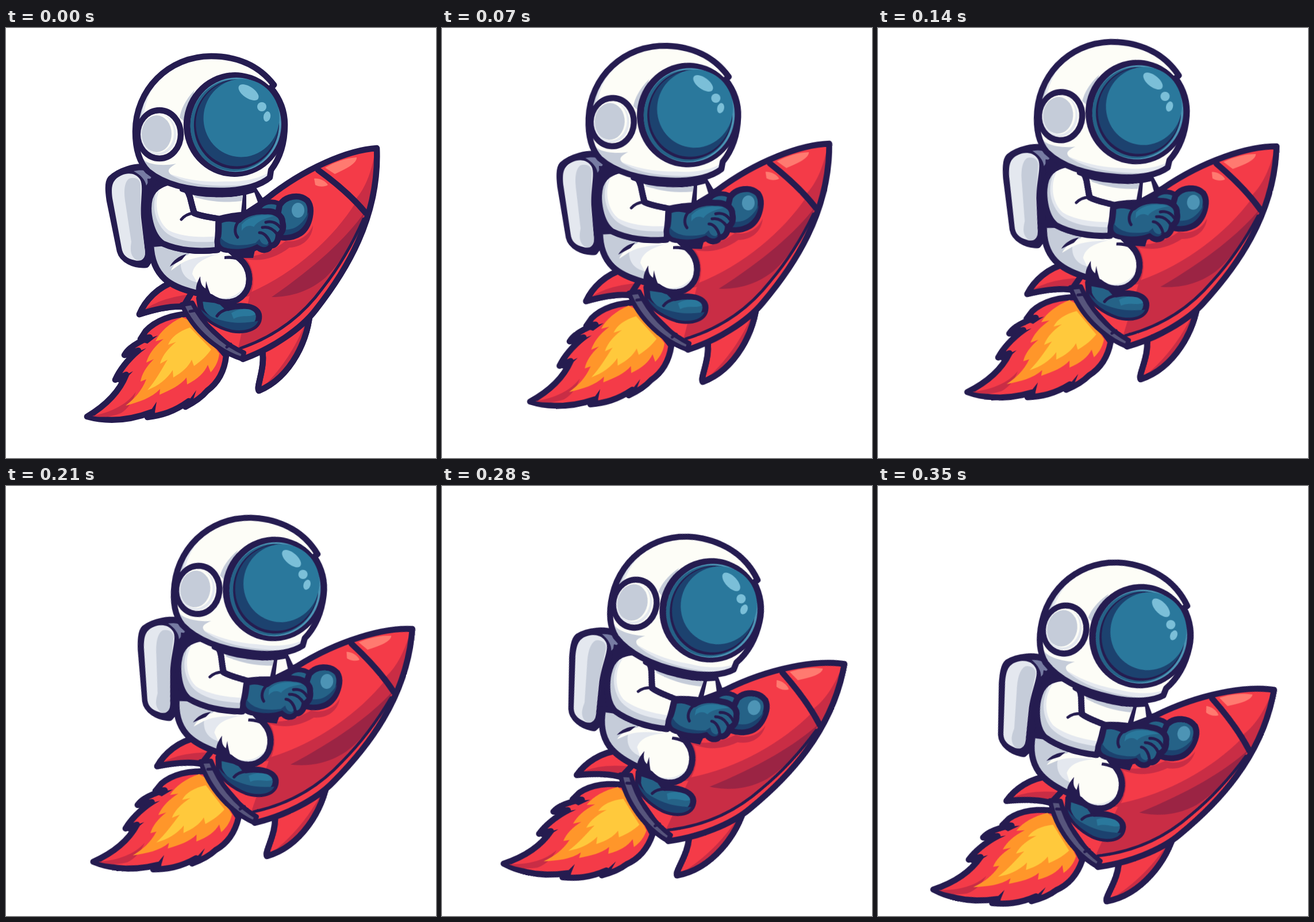
These frames come from a looping animation (748 px wide and 748 px high, 420 ms). An HTML page:

```html
<!DOCTYPE html>
<html lang="en">
<head>
<meta charset="utf-8">
<title>Astronaut riding a rocket</title>
<style>
  html, body { margin: 0; width: 100%; height: 100%; overflow: hidden; background: #fff; }
  svg { display: block; width: 100vw; height: 100vh; }

  #rider {
    transform-origin: 391.5px 441px;
    animation: fly 420ms step-end infinite;
  }
  @keyframes fly {
    0%      { transform: none; }
    16.667% { transform: translate(20.5px, -17px) rotate(2.05deg); }
    33.333% { transform: translate(31.5px, -23px) rotate(4.35deg); }
    50%     { transform: translate(36.5px, 8.5px) rotate(6.7deg); }
    66.667% { transform: translate(11px, 40.5px) rotate(12.45deg); }
    83.333% { transform: translate(0, 85.5px) rotate(12.45deg); }
  }

  .ink { stroke: #251c50; stroke-width: 10.5; stroke-linejoin: round; stroke-linecap: round; }
  .mid { stroke-width: 8; }
  .thin { stroke-width: 5; }
  .line { fill: none; }
  .navy { fill: #251c50; }
  .white { fill: #fdfdf7; }
  .pale { fill: #e4e8ef; }
  .grey { fill: #c5ccd9; }
  .slate { fill: #777ca3; }
  .steel { fill: #57557c; }
  .red { fill: #f43b48; }
  .crimson { fill: #c92d45; }
  .maroon { fill: #9b2444; }
  .pink { fill: #ff7a70; }
  .orange { fill: #ff962a; }
  .yellow { fill: #ffc93c; }
  .blue { fill: #2a789c; }
  .teal { fill: #256287; }
  .deep { fill: #1c426f; }
  .sky { fill: #4d94b5; }
  .glint { fill: #7bbfd8; }
</style>
</head>
<body>
<svg viewBox="0 0 748 748" role="img" aria-label="Astronaut riding a rocket">
  <defs>
    <path id="hull" d="M645 209C597 212 520 243 452 298L400 330L310 482L412 576C462 558 513 524 539 490C590 425 650 330 645 209Z"/>
    <path id="flame" d="M322 497C288 498 260 509 243 527L234 541L250 538C230 546 213 556 206 569L230 561C212 577 198 594 190 612L209 603C196 636 168 660 141 676C174 685 212 684 254 668L246 677C270 674 292 668 318 649L312 659C328 651 340 643 350 631C369 617 380 598 383 570Z"/>
    <path id="helmet" d="M466 99C439 64 400 49 357 49C282 49 225 108 225 180C225 210 232 234 247 249C281 277 330 284 380 283C415 282 444 273 459 260L461 247C477 226 485 200 485 168C485 143 476 122 461 104Z"/>
    <path id="thigh" d="M252 376L300 372L380 378L407 402C427 419 427 448 414 463C400 480 374 481 356 468L328 460C290 451 254 435 252 376Z"/>
    <path id="arm" d="M268 274C292 260 314 273 320 294L327 322C340 328 356 329 370 332L368 386C335 390 300 387 273 375C252 361 244 320 250 296C254 284 260 278 268 274Z"/>
    <path id="boot" d="M336 470L372 474L386 487C410 480 439 484 440 501C441 520 420 529 394 525C368 519 345 504 339 489Z"/>
    <path id="pack" d="M250 244C226 236 194 250 182 262C176 269 178 286 180 300L198 388C202 403 222 414 244 412L262 385L258 270Z"/>
    <path id="finR" d="M529 488C528 538 497 607 440 631C434 625 453 589 445 556C478 544 508 520 529 488Z"/>
    <path id="finL" d="M232 498C242 474 264 450 296 440L334 466L314 485C286 482 256 490 232 498Z"/>
    <clipPath id="inHull"><use href="#hull"/></clipPath>
    <clipPath id="inHelmet"><use href="#helmet"/></clipPath>
    <clipPath id="inThigh"><use href="#thigh"/></clipPath>
    <clipPath id="inArm"><use href="#arm"/></clipPath>
    <clipPath id="inBoot"><use href="#boot"/></clipPath>
    <clipPath id="inFinR"><use href="#finR"/></clipPath>
    <clipPath id="inFinL"><use href="#finL"/></clipPath>
  </defs>

  <g id="rider">
    <g id="fire">
      <use href="#flame" class="red ink"/>
      <path class="crimson" d="M150 675C185 668 211 654 226 633C221 649 213 662 200 670C182 677 166 678 150 675Z"/>
      <path class="navy" d="M233 545L264 535L246 549ZM205 573L244 557L221 575ZM188 614L221 597L201 618ZM243 679L262 650L258 674ZM308 662L331 630L323 655Z"/>
      <path class="orange" d="M306 503C284 514 268 528 260 545L274 541C258 554 248 568 244 582L257 576C244 589 236 602 234 615L244 611C236 632 223 645 208 657C232 650 253 644 268 628L267 638C287 629 303 622 314 608L315 620C334 610 345 600 351 586L356 599C366 588 370 577 371 566L330 514Z"/>
      <path class="yellow" d="M320 521C300 528 287 538 282 551L296 546C280 559 271 572 268 584L281 577C270 595 260 614 246 630C265 622 280 611 290 595L291 608C306 599 317 590 323 577L327 588C340 579 350 569 357 559Z"/>
    </g>

    <g id="rocket">
      <use href="#finL" class="red ink"/>
      <path class="crimson" clip-path="url(#inFinL)" d="M232 498C252 478 285 466 334 462L320 490Z"/>
      <use href="#finL" class="line ink"/>

      <use href="#finR" class="red ink"/>
      <path class="crimson" clip-path="url(#inFinR)" d="M532 480C518 532 486 590 440 631L470 628C510 602 535 540 532 480ZM444 556L490 535C478 552 462 561 448 566Z"/>
      <use href="#finR" class="line ink"/>

      <use href="#hull" class="red"/>
      <g clip-path="url(#inHull)">
        <path class="crimson" d="M608 304C570 364 506 424 425 460L400 575L470 570L660 330L660 190L643 208C638 244 626 280 606 300Z"/>
        <path class="maroon" d="M624 320C592 366 536 417 462 468C496 468 528 458 556 434C586 404 608 366 624 320Z"/>
        <path class="crimson" d="M405 395C432 402 462 390 487 370C504 374 526 364 534 343C533 366 516 381 493 382C470 400 444 407 418 402C432 418 434 447 424 466L408 470Z"/>
        <path class="red" d="M408 560C470 538 516 502 551 454C577 421 600 384 622 334L660 330L560 500L412 590Z"/>
        <path class="line ink thin" d="M408 557C470 536 516 500 551 452C577 419 600 382 622 332"/>
      </g>
      <path class="pink" d="M555 243C572 233 592 226 610 225C611 235 592 245 572 254ZM536 262C545 261 556 266 560 273C554 277 543 276 538 273Z"/>
      <path class="line ink" d="M543 247C572 268 602 293 626 322"/>
      <use href="#hull" class="line ink"/>
      <path class="steel ink mid" d="M306 481L324 478C342 514 374 547 414 565L411 576C370 563 326 528 306 481Z"/>
      <path class="line ink thin" d="M320 493L331 491M384 555L391 550"/>
    </g>

    <g id="backpack">
      <use href="#pack" class="navy ink"/>
      <path class="slate" d="M222 249C234 246 246 247 256 254L244 274C242 264 235 256 222 249Z"/>
      <path class="pale" d="M190 264C204 250 224 250 233 263C240 274 233 300 235 330L242 390C242 402 235 407 224 404C210 401 203 395 201 382L185 296C183 280 184 271 190 264Z"/>
      <path class="grey" d="M214 262C226 258 234 264 234 274L234 330L242 390C242 402 235 406 226 403C216 396 216 386 218 372L208 306C204 284 206 268 214 262Z"/>
    </g>

    <path class="navy" d="M246 262L430 270L452 304L430 400L256 400Z"/>
    <g id="chest">
      <path class="white" d="M322 286C350 296 385 297 412 291L409 320C390 322 378 324 367 328L333 321Z"/>
      <path class="grey" d="M322 286C350 296 385 297 412 291L410 301C380 305 352 301 330 295Z"/>
      <path class="white" d="M418 290L432 286L438 303L418 316Z"/>
    </g>

    <g id="legs">
      <use href="#boot" class="teal ink"/>
      <g clip-path="url(#inBoot)">
        <path class="deep" d="M334 484C354 508 395 520 446 508L440 540L330 530Z"/>
        <path class="blue" d="M392 496C408 485 431 487 434 498C424 504 410 498 396 506Z"/>
      </g>
      <path class="line ink thin" d="M386 489C377 491 371 495 367 501"/>
      <use href="#thigh" class="white ink"/>
      <g clip-path="url(#inThigh)">
        <path class="grey" d="M248 370L318 380L318 394C300 402 291 412 287 422L304 410C305 430 320 438 336 444C332 452 330 459 330 466L250 460Z"/>
        <path class="pale" d="M304 410C322 399 345 397 366 394C340 402 326 412 324 428L332 442C317 440 304 429 304 410ZM345 455C362 474 398 480 420 442L424 470L390 490L345 478Z"/>
      </g>
      <use href="#thigh" class="line ink"/>
      <path class="navy" d="M331 462C329 450 333 441 338 432C338 444 341 449 347 453L348 440C352 455 356 465 362 474L337 473ZM285 415C291 404 300 397 314 393L306 403ZM380 397C391 395 402 397 411 408C401 402 392 401 380 402Z"/>
    </g>

    <g id="farHand">
      <path class="teal ink mid" d="M440 313C448 302 462 300 474 305L480 324L446 326Z"/>
      <path class="teal ink" d="M476 308C486 292 510 288 524 300C535 313 529 345 512 357C496 367 476 367 466 358Z"/>
      <path class="deep" d="M481 350C501 354 518 340 526 320C526 342 508 362 480 360Z"/>
      <ellipse class="sky" cx="508" cy="317" rx="11" ry="13"/>
    </g>

    <g id="nearArm">
      <use href="#arm" class="white ink"/>
      <g clip-path="url(#inArm)">
        <path class="grey" d="M272 268C251 288 255 338 282 358C306 372 340 373 374 370L374 400L270 392L240 340L244 280Z"/>
        <path class="pale" d="M274 272C256 290 258 333 283 352C306 364 340 365 374 362L374 371C335 374 303 373 281 358C253 336 250 290 274 272Z"/>
      </g>
      <use href="#arm" class="line ink"/>
      <path class="line ink thin" d="M326 322C317 323 310 327 305 333M317 290L321 306"/>
    </g>

    <g id="nearHand">
      <path class="teal ink" d="M370 336C381 329 394 331 405 334C416 322 434 318 450 319C466 317 481 325 481 338C484 349 480 357 474 360C474 372 467 380 460 378C457 389 443 388 438 380C424 388 404 391 389 386C375 386 366 381 368 368C371 356 370 347 370 336Z"/>
      <path class="deep" d="M373 364C383 377 402 382 434 374L441 367C444 376 451 379 458 375C454 384 444 382 437 376C419 386 394 386 381 382C371 379 372 371 373 364Z"/>
      <path class="blue" d="M410 342C422 327 444 323 466 327C451 331 437 336 431 346C422 341 414 346 410 353Z"/>
      <path class="line ink thin" d="M405 336C397 345 397 357 403 364M452 338C462 335 471 339 477 347M446 347C457 345 466 351 472 359M441 356C449 356 456 364 459 373"/>
    </g>

    <g id="head">
      <use href="#helmet" class="white"/>
      <g clip-path="url(#inHelmet)">
        <path class="pale" d="M303 60C262 84 243 116 240 154L220 190L220 110L280 50ZM236 225C270 256 326 270 381 267C420 268 446 260 466 246L470 300L300 300L230 260Z"/>
        <path class="grey" d="M280 66C252 92 240 118 236 154L216 190L216 110ZM238 230C255 239 275 240 296 236C282 244 279 249 288 256C318 273 360 276 400 274C425 273 447 268 466 255L470 300L300 300L230 260Z"/>
        <path class="grey" d="M328 108C311 126 304 143 302 156L312 164Z"/>
      </g>
      <use href="#helmet" class="line ink"/>
      <path class="line ink mid" d="M306 281C340 293 385 294 430 281"/>

      <g id="visor" transform="rotate(8 398 167)">
        <ellipse class="navy" cx="398" cy="168" rx="89" ry="91"/>
        <ellipse class="sky" cx="400" cy="168" rx="79" ry="82"/>
        <ellipse class="teal" cx="398" cy="169" rx="77" ry="80"/>
        <ellipse class="navy" cx="401" cy="167" rx="74" ry="78"/>
        <ellipse class="deep" cx="402" cy="165" rx="72" ry="75"/>
        <ellipse class="blue" cx="408" cy="155" rx="66" ry="68"/>
      </g>
      <g class="glint">
        <ellipse cx="422" cy="112" rx="20" ry="10" transform="rotate(34 422 112)"/>
        <circle cx="445" cy="137" r="8"/>
        <ellipse cx="454" cy="154" rx="6" ry="9" transform="rotate(12 454 154)"/>
      </g>

      <g id="earpiece">
        <ellipse class="white ink" cx="267" cy="185" rx="37" ry="42"/>
        <ellipse class="pale" cx="265" cy="185" rx="31" ry="36"/>
        <ellipse class="white" cx="264" cy="183" rx="28" ry="34"/>
        <ellipse class="grey" cx="262" cy="184" rx="26" ry="32"/>
      </g>
    </g>
  </g>
</svg>
</body>
</html>
```
